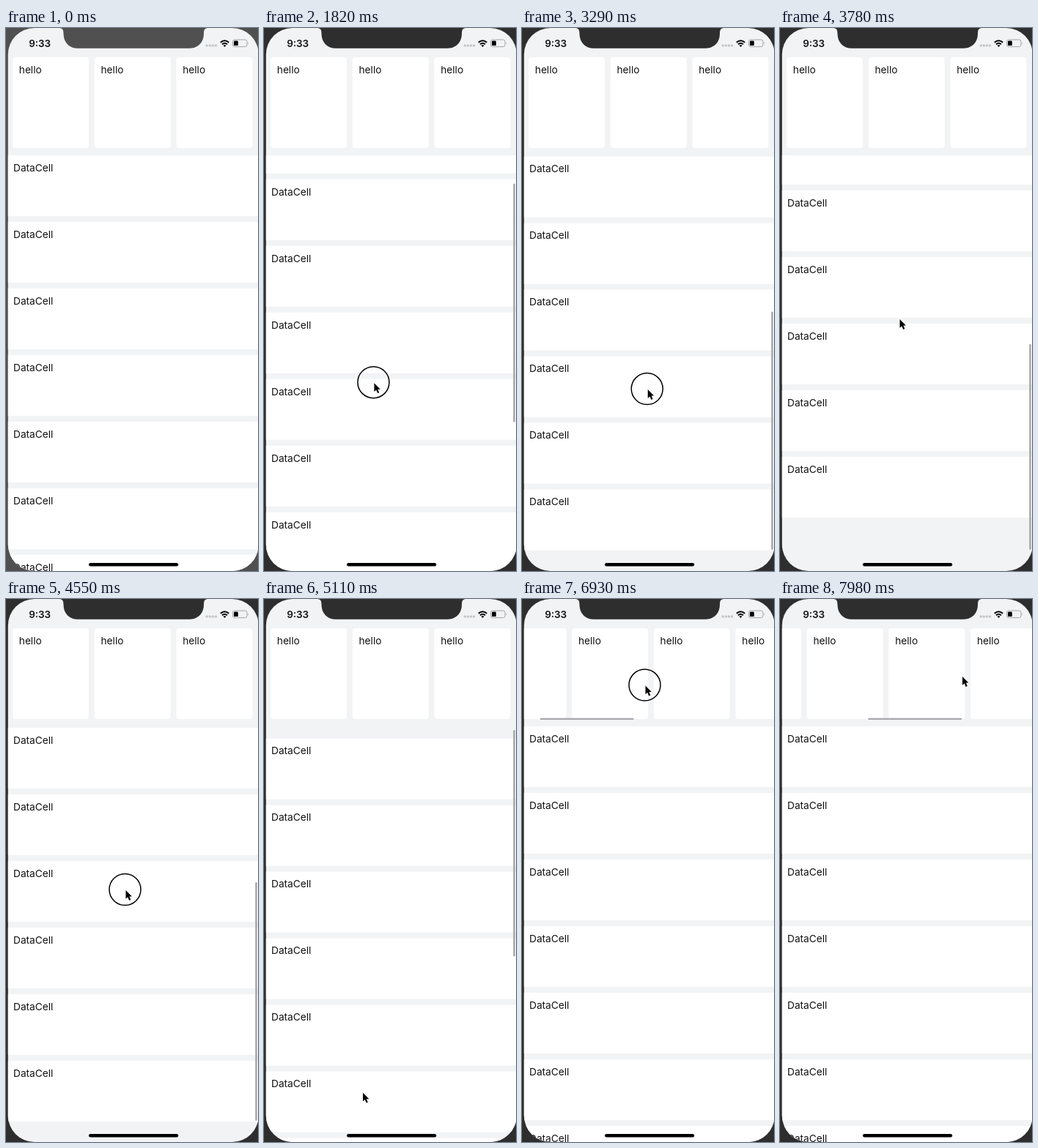
An HTML page that plays this animation: 344 px wide and 742 px high, repeating every 8 s.

```html
<!DOCTYPE html>
<html lang="en">
<head>
<meta charset="utf-8">
<title>Scrolling lists</title>
<style>
html, body { margin: 0; width: 100%; height: 100%; overflow: hidden; }
svg { display: block; width: 344px; height: 742px; }
text { font: 13.7px Inter, Roboto, sans-serif; fill: #111; }
.clock { font-weight: 600; font-size: 13.4px; }
</style>
</head>
<body>
<svg viewBox="0 0 344 742" xmlns="http://www.w3.org/2000/svg">
  <defs>
    <clipPath id="screen"><rect x="2.8" y="0" width="342" height="742" rx="36"/></clipPath>
    <clipPath id="list"><rect x="0" y="174" width="344" height="568"/></clipPath>
  </defs>
  <rect id="bezel" width="344" height="742"/>
  <g clip-path="url(#screen)">
    <rect width="345" height="742" fill="#f2f3f5"/>
    <g clip-path="url(#list)"><g id="rows"></g></g>
    <g id="cards"></g>
    <rect id="barY" x="340.3" width="2.4" rx="1.2" fill="#a3a3a5"/>
    <rect id="barX" y="162.8" width="128" height="2.2" rx="1.1" fill="#a8a8ac"/>
  </g>
  <path id="notch" d="M72 0C77 0 78.500 2 78.500 8C78.500 20 87 27.800 98 27.800H250.500C261.500 27.800 270 20 270 8C270 2 271.500 0 276.500 0Z"/>
  <text class="clock" x="31.200" y="25.800">9:33</text>
  <g id="dots" fill="#c3c4c7"></g>
  <g fill="none" stroke="#000" stroke-width="2">
    <path d="M292.800 19.700Q298.500 14.700 304.200 19.700"/>
    <path d="M295 22.300Q298.500 19.200 302 22.300"/>
  </g>
  <path d="M296.500 23.700Q298.500 22.200 300.500 23.700L298.500 25.900Z"/>
  <rect x="309.500" y="16" width="19.500" height="9.600" rx="2.600" fill="none" stroke="#a4a5a8"/>
  <rect x="311" y="17.500" width="5.800" height="6.600" rx="1.200"/>
  <path d="M330 19.200Q331.700 20.800 330 22.500Z" fill="#a4a5a8"/>
  <rect x="113" y="731" width="122.200" height="4.500" rx="2.250"/>
  <g id="pointer">
    <circle id="touch" cx="-1" cy="-1" r="21.500" fill="none" stroke="#000" stroke-width="1.500"/>
    <path d="M0 0V11.800L2.700 9.300L4.700 13.900L6.800 13L4.900 8.500H8.400Z" stroke="#fff" stroke-width="1.600" stroke-linejoin="round" paint-order="stroke"/>
  </g>
</svg>
<script>
const LOOP = 8000, STEP = 70, FOCUS = 1400, PRESS_LEAD = 160;
const ROW = 91, CARD = 111.7;
const MAX_Y = 362, BAR_TOP = 179, BAR_END = 713, BAR_LEN = 326;

const $ = id => document.getElementById(id);
const set = (id, attrs) => {
  for (const key in attrs) $(id).setAttribute(key, attrs[key]);
};
const clamp = u => Math.min(1, Math.max(0, u));
const ease = u => u * u * (3 - 2 * u);
const flick = u => ease(1 - (1 - u) ** 2);
const progress = (t, from, to) => clamp((t - from) / (to - from));

function add(parent, tag, attrs, label = '') {
  const el = document.createElementNS('http://www.w3.org/2000/svg', tag);
  for (const key in attrs) el.setAttribute(key, attrs[key]);
  el.textContent = label;
  $(parent).appendChild(el);
}

for (let i = 0; i < 10; i++) {
  const y = 174 + i * ROW;
  add('rows', 'rect', { x: 2, y, width: 343, height: 83, fill: '#fff' });
  add('rows', 'text', { x: 10, y: y + 21.8 }, 'DataCell');
}
for (let i = 0; i < 8; i++) {
  const x = 9 + i * CARD;
  add('cards', 'rect', { x, y: 40, width: 104, height: 124, rx: 4, fill: '#fff' });
  add('cards', 'text', { x: x + 8.8, y: 61.8 }, 'hello');
}
for (let i = 0; i < 4; i++) {
  add('dots', 'rect', { x: 272.6 + i * 4.1, y: 22.4, width: 3.2, height: 3, rx: 1 });
}

// The list is thrown past its end, pulled again, then thrown back to the top.
const throws = [
  { from: 1606, to: 2470, y: 379 },
  { from: 2470, to: 2760, y: MAX_Y },
  { from: 3270, to: 3670, y: 414 },
  { from: 3670, to: 4150, y: MAX_Y },
  { from: 4620, to: 5080, y: -16.7 },
  { from: 5100, to: 5500, y: 0 }
];

const enter = { x: 36, y: 737 };
const moves = [
  { from: 560, to: 1120, x: 145, y: 568 },
  { from: 1560, to: 2320, x: 165, y: 262.5, drag: true },
  { from: 2700, to: 3080, x: 172, y: 497 },
  { from: 3250, to: 3640, x: 163.5, y: 398, drag: true },
  { from: 4600, to: 5000, x: 135, y: 674.7, drag: true },
  { from: 5320, to: 6090, x: 226, y: 149 },
  { from: 6160, to: 6440, x: 254, y: 119 },
  { from: 6740, to: 7150, x: 62, y: 118, drag: true },
  { from: 7350, to: 7980, x: 249, y: 106 }
];

// Eases one value through a chain of moves.
const follow = (chain, key, start, t) => chain.reduce(
  (value, m) => value + (m[key] - value) * ease(progress(t, m.from, m.to)), start);

const pressed = t => moves.some(m => m.drag && t >= m.from - PRESS_LEAD && t < m.to);

function draw(t) {
  const y = follow(throws, 'y', 0, t);
  const x = 307.4 * flick(progress(t, 6757, 7980));
  const fill = t < FOCUS ? '#505050' : '#2e2e2e';
  set('bezel', { fill });
  set('notch', { fill });
  set('rows', { transform: `translate(0 ${-y})` });
  set('cards', { transform: `translate(${-x} 0)` });

  // The bar shrinks by however far the list is pulled past an end.
  const height = BAR_LEN - Math.max(0, -y, y - MAX_Y);
  set('barY', {
    y: BAR_TOP + clamp(y / MAX_Y) * (BAR_END - BAR_TOP - height),
    height,
    opacity: y === 0 && t < 3000 ? 0 : 1 - progress(t, 5730, 5980)
  });
  set('barX', { x: 5 + x * 0.375, opacity: x > 0 ? 1 : 0 });

  const px = follow(moves, 'x', enter.x, t), py = follow(moves, 'y', enter.y, t);
  set('pointer', { transform: `translate(${px} ${py})`, opacity: t < moves[0].from ? 0 : 1 });
  set('touch', { opacity: pressed(t) ? 1 : 0 });
}

const start = performance.now();
function tick() {
  const t = (performance.now() - start) % LOOP;
  draw(Math.floor(t / STEP) * STEP);
  requestAnimationFrame(tick);
}
tick();
</script>
</body>
</html>
```
